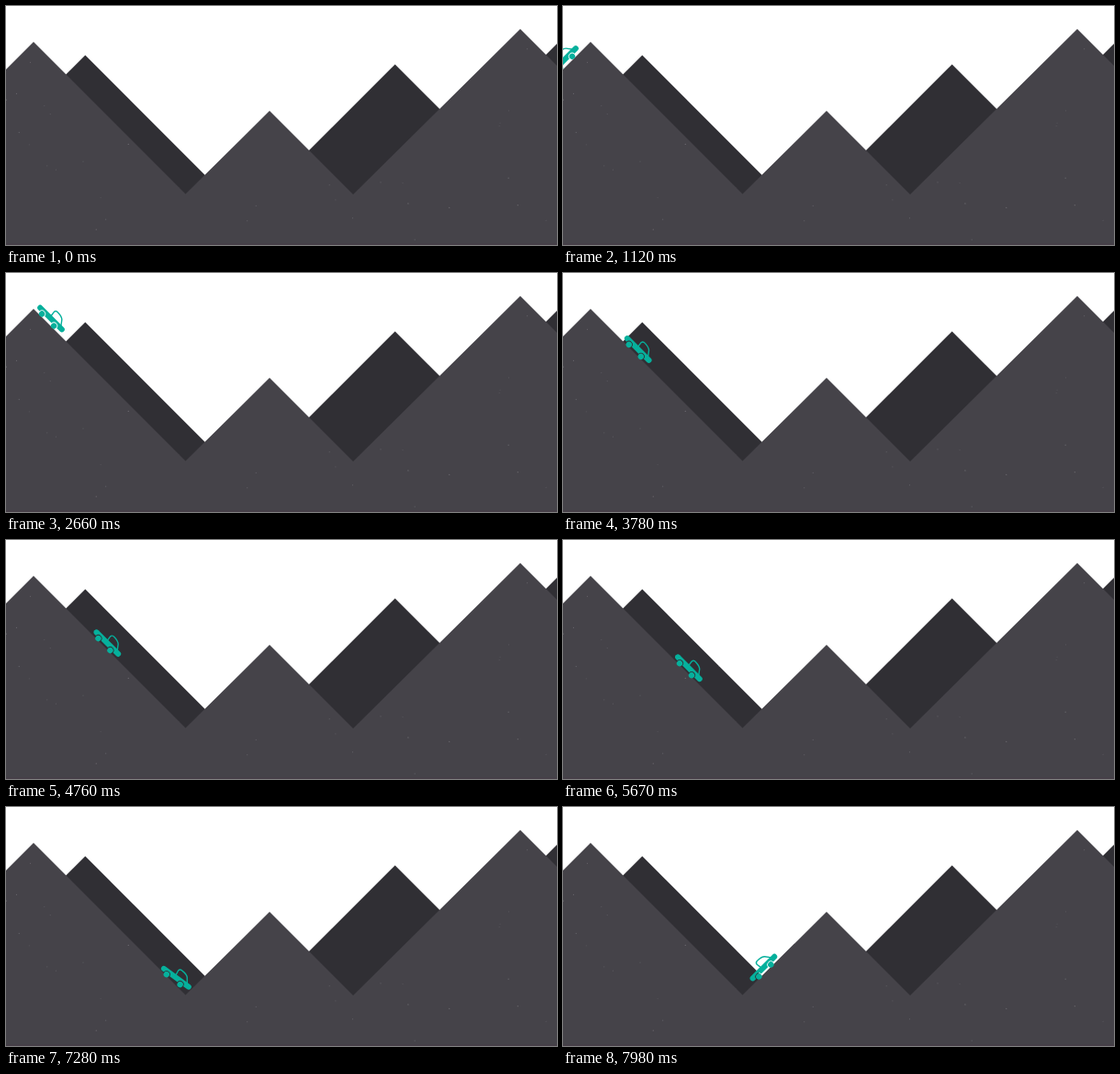
Write an HTML page that moves like this. It is 600 px wide and 260 px high and loops after 8000 ms.

```html
<!DOCTYPE html>
<html lang="en">
<head>
<meta charset="utf-8">
<title>Truck in the mountains</title>
<style>
  html, body { margin: 0; width: 100%; height: 100%; overflow: hidden; background: #fff; }
  svg { display: block; width: 600px; height: 260px; }
</style>
</head>
<body>
<svg viewBox="0 0 600 260">
  <defs>
    <mask id="arches" maskUnits="userSpaceOnUse" x="-25" y="-20" width="50" height="40">
      <path fill="#fff" d="M-25 -20H25V20H-25Z"/>
      <circle cx="-10.6" cy="3.4" r="4"/>
      <circle cx="7.8" cy="3.4" r="4"/>
    </mask>
    <clipPath id="ridge">
      <path id="front" d="M0 69 30 39 195.5 204.5 287 114 378 205 560 25 600 65V260H0Z"/>
    </clipPath>
  </defs>
  <g fill="#302f34">
    <path d="M40 99.8 86.3 53.5 236 203.2V260H40Z"/>
    <path d="M310 177 423.6 63.4 520 159.8V260H310Z"/>
    <path d="M570 71 600 41V100H570Z"/>
  </g>
  <use href="#front" fill="#454349"/>
  <path fill="#473f48" d="M0 258.5H600V260H0Z"/>
  <g id="specks" fill="#8d8c92" clip-path="url(#ridge)"></g>
  <g id="truck" fill="#06b09c" stroke="#06b09c" stroke-linecap="round" stroke-linejoin="round">
    <path mask="url(#arches)" fill="none" stroke-width="6" d="M-16.7 0H16.7"/>
    <path fill="none" stroke-width="1.4" d="M-2 -2 -2.8 -7.5Q-2.5 -10.3 .7 -10 7 -9.8 9.2 -7.5L13 -2.5"/>
    <g stroke="none">
      <circle cx="-10.6" cy="3.4" r="3.2"/>
      <circle cx="7.8" cy="3.4" r="3.2"/>
    </g>
  </g>
</svg>
<script>
  const LOOP = 8000, STEP = 70;

  // Each leg runs at steady speed (px/s) along y = base + slope * x.
  const legs = [
    { from: 0, to: 1890, x: -19.8, speed: 19.5, base: 60, slope: -1 },
    { from: 2310, to: 7240, x: 38.8, speed: 29.2, base: -0.4, slope: 1.02 },
    { from: 7660, to: LOOP, x: 210.1, speed: 26, base: 393, slope: -1 }
  ];

  function ride(leg, t) {
    const x = leg.x + leg.speed * (t - leg.from) / 1000;
    return [x, leg.base + leg.slope * x, Math.sign(leg.slope) * 45];
  }

  // On a leg the truck rides the slope; between legs it tips over evenly.
  function pose(t) {
    const i = legs.findIndex(leg => t <= leg.to), next = legs[i];
    if (t >= next.from) return ride(next, t);
    const last = legs[i - 1];
    const a = ride(last, last.to), b = ride(next, next.from);
    const p = (t - last.to) / (next.from - last.to);
    return a.map((v, n) => v + (b[n] - v) * p);
  }

  function seeded(seed) {
    return () => (seed = seed * 16807 % 2147483647) / 2147483647;
  }

  const rand = seeded(41);
  const speck = () =>
    `<circle cx="${600 * rand()}" cy="${260 * rand()}" r=".6" opacity="${.2 + .4 * rand()}"/>`;
  document.getElementById('specks').innerHTML = Array.from({ length: 50 }, speck).join('');

  const truck = document.getElementById('truck');
  const start = performance.now();

  function tick() {
    const t = Math.floor((performance.now() - start) % LOOP / STEP) * STEP;
    const [x, y, tilt] = pose(t);
    truck.setAttribute('transform', `translate(${x} ${y}) rotate(${tilt})`);
    requestAnimationFrame(tick);
  }
  tick();
</script>
</body>
</html>
```
